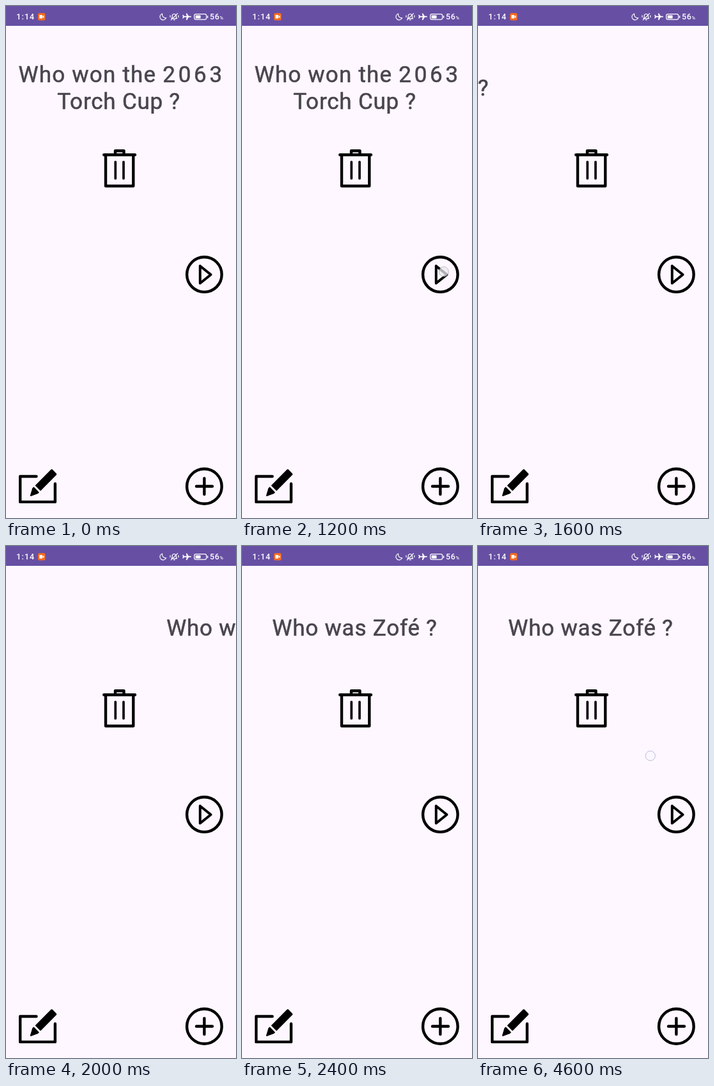
Animation of 360 by 800 pixels, one loop 4.8 s. Source, as an HTML page:

```html
<!DOCTYPE html>
<html lang="en">
<head>
<meta charset="utf-8">
<title>Quiz cards</title>
<style>
  html, body { margin: 0; width: 100%; height: 100%; overflow: hidden; background: #fef7ff; }
  svg { display: block; width: 100vw; height: 100vh; font-family: Roboto, sans-serif; }
  .title { font-size: 35px; letter-spacing: .8px; text-anchor: middle; fill: #49454f; stroke: #49454f; stroke-width: .6; stroke-linejoin: round; }
  .wide { letter-spacing: 1.2px; }
  .year { letter-spacing: 4.8px; }
  .bar { fill: #fff; font-size: 12.5px; font-weight: 500; letter-spacing: .7px; }
  .line { fill: none; stroke: #fff; stroke-width: 1.2; stroke-linecap: round; stroke-linejoin: round; }
  .icon { fill: none; stroke: #000; stroke-width: 4.4; stroke-linecap: round; stroke-linejoin: round; }
</style>
</head>
<body>
<svg viewBox="0 0 360 800">
  <rect width="360" height="800" fill="#fef7ff"/>

  <g id="card" class="title">
    <g id="first">
      <text class="wide" x="181.3" y="119">Who won the <tspan class="year">2063</tspan></text>
      <text x="176.5" y="161">Torch Cup ?</text>
    </g>
    <text id="second" x="176.5" y="140">Who was Zofé ?</text>
  </g>

  <!-- Status bar -->
  <rect width="360" height="31" fill="#6750a4"/>
  <g class="bar">
    <text x="16.3" y="21" letter-spacing="1.1">1:14</text>
    <rect x="50" y="11" width="11.5" height="11.5" rx="2.5" fill="#f26a21"/>
    <path d="M52.3 14h4.6v5.4h-4.6zM57.3 16.2l2.2-1.6v4.4l-2.2-1.6z"/>
    <path class="line" d="M244.6 12A5 5 0 1 0 250.6 18.6A5.4 5.4 0 0 1 244.6 12z"/>
    <path class="line" d="M259 19.6h8.6l-1.2-1.8v-2.2a3.1 3.1 0 0 0-6.2 0v2.2zM262.4 21.6h1.8M258.3 21.8l10.2-10.2M257 14.8v2.6M269.8 14.8v2.6"/>
    <path d="M276.3 13.8h1.2l1.3 2h4l-1-4.4h1.4l2.8 4.4h2.8q1.2 .2 1.2 .9t-1.2 .9h-2.8l-2.8 4.4h-1.4l1-4.4h-4l-1.3 2h-1.2l.6-2.9z"/>
    <rect class="line" x="294.7" y="12.6" width="19" height="8.6" rx="2.6"/>
    <rect x="296.6" y="14.4" width="8" height="5" rx="1"/>
    <rect x="314.8" y="15" width="1.5" height="4" rx=".7"/>
    <text x="319" y="21">56<tspan font-size="7.5" letter-spacing="0">%</tspan></text>
  </g>

  <!-- Bin -->
  <g class="icon">
    <path d="M153.2 232.5H202M171 231V226.2H184.5V231M156 233V281.2H199.3V233"/>
    <path d="M171.3 243.5V269.5M184 243.5V269.5" stroke-width="3.7"/>
  </g>

  <!-- Play, add -->
  <g class="icon">
    <circle cx="310.4" cy="419.6" r="27.3"/>
    <path d="M303.8 406.2V433.2L320.6 419.7z" stroke-width="4"/>
    <circle cx="310.4" cy="750.5" r="27.3"/>
    <path d="M298 750.5H323M310.4 738V763"/>
  </g>

  <!-- Edit -->
  <path class="icon" d="M47.5 735H22.2V774.9H76.9V746.5"/>
  <path d="M70.4 724.2Q71.6 723.1 72.8 724.2L78.8 730.4Q79.8 731.6 78.8 732.8L54 757.8L45.6 749.2z"/>
  <path d="M43.4 751.3L52 760L49.8 762.1L38.8 766Q37.6 766 37.9 764.6L41.2 753.5z"/>

  <circle id="touch" r="7.6"/>
</svg>
<script>
  const LOOP = 4800, STEP = 200;
  const EXIT = 1247, EXIT_MS = 500, ENTER = 1681, ENTER_MS = 697, WIDTH = 360;
  const byId = id => document.getElementById(id);
  const card = byId('card'), first = byId('first'), second = byId('second'), touch = byId('touch');

  const ease = p => (1 - Math.cos(Math.PI * Math.min(1, Math.max(0, p)))) / 2;
  const show = (el, on) => el.setAttribute('visibility', on ? 'visible' : 'hidden');

  // The card leaves to the left, then comes back from the right.
  const slide = t => t < ENTER
    ? -WIDTH * ease((t - EXIT) / EXIT_MS)
    : WIDTH * (1 - ease((t - ENTER) / ENTER_MS));

  function setTouch(x, y, fill, stroke, opacity) {
    const attrs = { cx: x, cy: y, fill, stroke, opacity };
    for (const name in attrs) touch.setAttribute(name, attrs[name]);
  }

  function draw(t) {
    card.setAttribute('transform', `translate(${slide(t).toFixed(2)} 0)`);
    show(first, t < EXIT);
    show(second, t >= EXIT);
    if (t >= 1000 && t < 1600) setTouch(315.8, 415, '#ece9ef', '#aaa8b0', t < 1400 ? .75 : .42);
    else if (t >= 4600) setTouch(269.8, 327.8, '#fbf6ff', '#b9bedb', 1);
    else setTouch(0, 0, 'none', 'none', 0);
  }

  // The picture advances five times per second.
  const start = performance.now();
  function tick() {
    const t = (performance.now() - start) % LOOP;
    draw(Math.floor(t / STEP) * STEP);
    requestAnimationFrame(tick);
  }
  tick();
</script>
</body>
</html>
```
